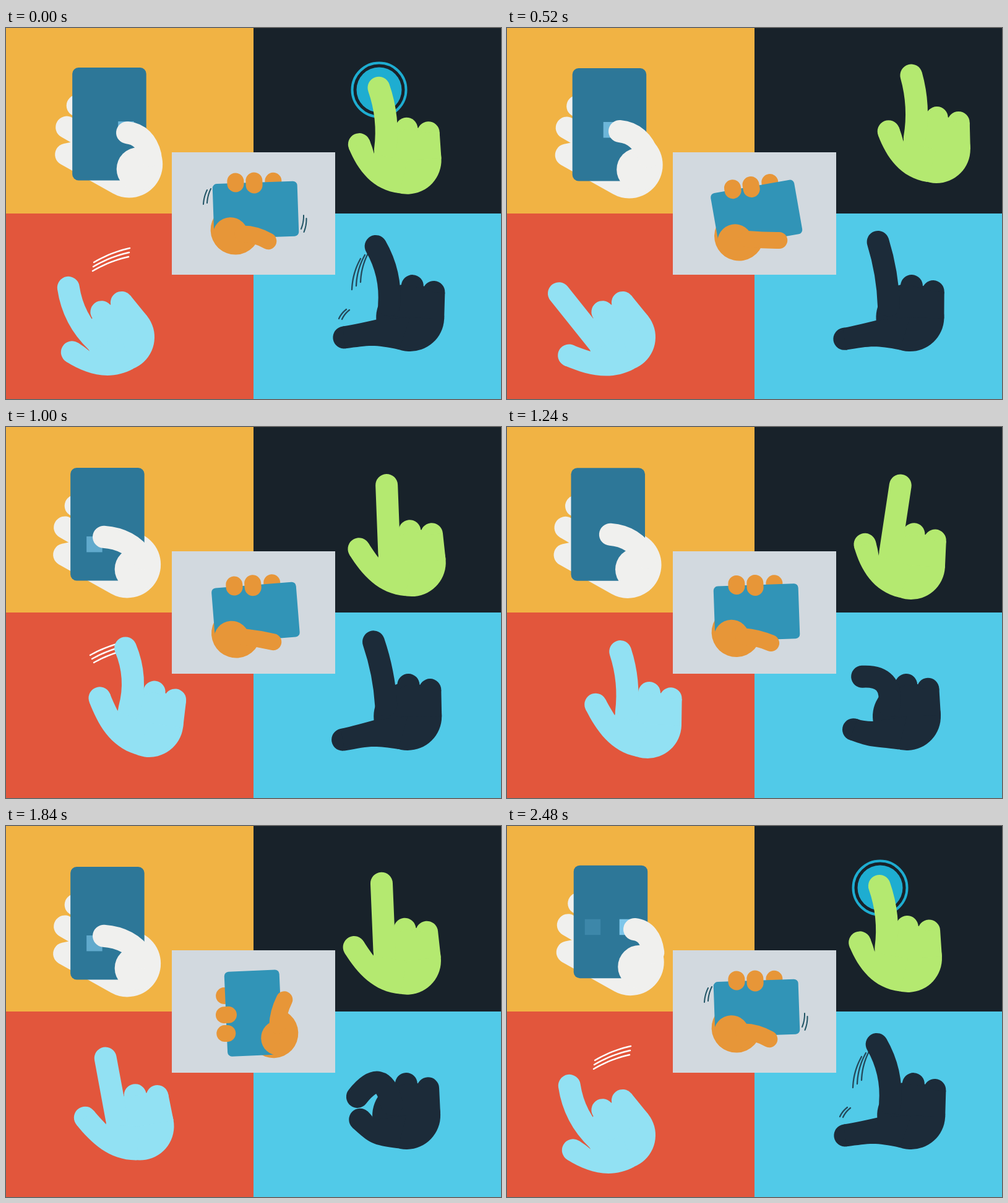
Animation of 800x600 px, one loop 2520 ms. Source, as an HTML page with a canvas:

```html
<!DOCTYPE html>
<html lang="en">
<head>
<meta charset="utf-8">
<title>Hand gestures</title>
<style>
  html, body { margin: 0; width: 100%; height: 100%; overflow: hidden; }
  canvas { display: block; width: 800px; height: 600px; }
</style>
</head>
<body>
<canvas id="stage" width="800" height="600"></canvas>
<script>
const ctx = document.getElementById('stage').getContext('2d');
const LOOP = 2520, STEP = 40, TYPING_LOOP = 840;
const SNAP = 2290, SNAPPED = 2440;
const RAD = Math.PI / 180, TURN = 2 * Math.PI;

const clamp = v => Math.max(0, Math.min(1, v));
const mod = (v, m) => ((v % m) + m) % m;
const mix = (a, b, u) => a + (b - a) * u;
const mixPoint = (a, b, u) => a.map((v, i) => mix(v, b[i], u));

function ease(t, from, to) {
  const u = clamp((t - from) / (to - from));
  return u * u * (3 - 2 * u);
}

// Eased moves one after another, each [from, to, value]
const glide = (t, value, ...moves) =>
  moves.reduce((v, [from, to, goal]) => mix(v, goal, ease(t, from, to)), value);

function paint(color) {
  ctx.fillStyle = ctx.strokeStyle = color;
}

function panel(color, x, y, w, h) {
  paint(color);
  ctx.fillRect(x, y, w, h);
}

function disc(x, y, r) {
  ctx.beginPath();
  ctx.arc(x, y, r, 0, TURN);
  ctx.fill();
}

// Hull of two circles
function capsule(x1, y1, r1, x2, y2, r2) {
  const a = Math.atan2(y2 - y1, x2 - x1);
  const b = Math.acos((r1 - r2) / Math.hypot(x2 - x1, y2 - y1));
  ctx.beginPath();
  ctx.arc(x1, y1, r1, a + b, a - b + TURN);
  ctx.arc(x2, y2, r2, a - b, a + b);
  ctx.fill();
}

function roundRect(x, y, w, h, r) {
  ctx.beginPath();
  ctx.roundRect(x, y, w, h, r);
  ctx.fill();
}

function limb(tip, control, base, width) {
  ctx.lineWidth = width;
  ctx.lineCap = 'round';
  ctx.beginPath();
  ctx.moveTo(...tip);
  ctx.quadraticCurveTo(...control, ...base);
  ctx.stroke();
}

// Point beside the middle of a line, off by a distance
function bowed([x1, y1], [x2, y2], distance) {
  const dx = x2 - x1, dy = y2 - y1, k = distance / Math.hypot(dx, dy);
  return [(x1 + x2) / 2 + dy * k, (y1 + y2) / 2 - dx * k];
}

// Parallel speed lines that shoot out, then run off from the tail
function streaks(t, start, width, count, from, to, shift, bow) {
  const age = mod(t - start, LOOP);
  const head = clamp(age / 80), tail = clamp((age - 120) / 120);
  if (head <= tail) return;
  const length = Math.hypot(to[0] - from[0], to[1] - from[1]);
  const control = bowed(from, to, bow * length);
  const pointAt = u => mixPoint(mixPoint(from, control, u), mixPoint(control, to, u), u);
  ctx.lineWidth = width;
  ctx.lineCap = 'round';
  for (let n = 0; n < count; n++) {
    ctx.beginPath();
    for (let i = 0; i <= 12; i++) {
      const [x, y] = pointAt(mix(tail, head, i / 12));
      ctx.lineTo(x + n * shift[0], y + n * shift[1]);
    }
    ctx.stroke();
  }
}

// Fist with index finger and thumb, measured from the middle of the palm
function drawHand(color, { x, y, turn, tip, bend, base = [-35, -18], thumb, angle, creaseY = -12 }) {
  const ax = Math.cos(angle * RAD), ay = Math.sin(angle * RAD);
  const outX = thumb[0] - 18 * ay, outY = thumb[1] + 18 * ax;
  const inX = thumb[0] + 18 * ay, inY = thumb[1] - 18 * ax;
  ctx.save();
  ctx.translate(x, y);
  ctx.rotate(turn * RAD);
  paint(color);
  disc(0, 0, 55);
  disc(1, -51, 18);
  disc(36, -43, 18);
  ctx.beginPath();
  for (const corner of [[-28, -40], [1, -51], [36, -43], [54, -43], [55, 0], [-28, 0]]) {
    ctx.lineTo(...corner);
  }
  ctx.fill();
  limb(tip, bowed(tip, base, bend), base, 36);
  disc(...thumb, 18);
  ctx.beginPath();
  ctx.moveTo(outX, outY);
  ctx.bezierCurveTo(outX + 38 * ax, outY + 38 * ay, -58, 46, -15, 53);
  ctx.lineTo(0, 0);
  ctx.lineTo(-53, creaseY);
  ctx.quadraticCurveTo(inX + 12 * ax, inY + 12 * ay, inX, inY);
  ctx.fill();
  ctx.restore();
}

// A tucked thumb points further down
const thumbPose = tuck => ({ thumb: [-85 + 12 * tuck, -29], angle: 61 + 13 * tuck });

const keys = [
  { at: 60, x: 26, y: 111 },
  { at: 450, x: 50, y: 87 },
  { at: 610, x: 18, y: 87 },
  { at: 770, x: 74, y: 87 }
];

function lastOf(events, t, period) {
  const age = e => mod(t - e.at, period);
  const last = events.reduce((a, b) => age(b) < age(a) ? b : a);
  const next = events[(events.indexOf(last) + 1) % events.length];
  return { last, next, age: age(last), gap: mod(next.at - last.at, period) };
}

function drawTyping(time) {
  const t = time % TYPING_LOOP;
  const { last, next, age, gap } = lastOf(keys, t, TYPING_LOOP);
  const move = ease(age, gap - 85, gap);
  const tipX = 132 + mix(last.x, next.x, move);
  const tipY = 167 + 0.45 * (mix(last.y, next.y, move) - 87);
  const bob = Math.cos(TURN * (t + 120) / TYPING_LOOP);

  ctx.save();
  ctx.translate(-2.5 + 2.7 * bob, 1.6 - 1.7 * bob);
  paint('#f0f0ee');
  disc(116, 125, 17.5);
  capsule(99, 160, 18, 130, 178, 18);
  capsule(98, 204, 18, 200, 220, 54);
  paint('#2d7798');
  roundRect(108, 63.5, 119.5, 182.5, 10);
  paint('#7dc6ea');
  for (const key of keys) {
    ctx.globalAlpha = clamp(1 - (mod(t - key.at, TYPING_LOOP) - 30) / 200);
    ctx.fillRect(108 + key.x, 63.5 + key.y, 25.5, 25.5);
  }
  ctx.globalAlpha = 1;
  paint('#f0f0ee');
  disc(214.5, 227.5, 35);
  ctx.restore();

  paint('#f0f0ee');
  const reach = tipX - 155;
  limb([tipX, tipY], [198 + 0.66 * reach, tipY + 3], [221 + 0.3 * reach, 213 - 0.17 * reach], 36);
}

const taps = [
  { at: 600, spot: [647, 78], palm: [692, 196] },
  { at: 1440, spot: [595, 104], palm: [648, 224] },
  { at: 2440, spot: [603, 100], palm: [648, 214] }
];

function drawRipple(age, [x, y]) {
  if (age >= 280) return;
  const grow = clamp((age - 80) / 200);
  ctx.globalAlpha = 1 - grow;
  paint('#1eadd1');
  disc(x, y, 36.5 + 4 * grow);
  ctx.lineWidth = 4;
  ctx.beginPath();
  ctx.arc(x, y, 43.5 + 6 * grow, 0, TURN);
  ctx.stroke();
  ctx.globalAlpha = 1;
}

function drawTapping(t) {
  const { last, next, age, gap } = lastOf(taps, t, LOOP);
  const p = age / gap;
  const press = glide(p, 1, [0.12, 0.36, 0], [0.78, 0.9, 1]);
  const windup = glide(p, 0, [0.45, 0.78, 1], [0.8, 0.94, 0]);
  const [x, y] = mixPoint(last.palm, next.palm, ease(p, 0.08, 0.62));
  drawRipple(age, last.spot);
  drawHand('#b4e970', {
    x: x + 5 * windup, y,
    turn: glide(p, -2.5, [0.12, 0.38, -5], [0.45, 0.78, 4], [0.8, 0.94, -2.5]),
    tip: mixPoint([-30 + 4 * windup, -128], [-41, -119], press),
    bend: 12 * press,
    ...thumbPose(Math.max(0.15, 0.7 * press, 0.7 * windup))
  });
}

function drawSwiping(t) {
  const swing = glide(t, 0, [560, 820, -0.08], [880, 1000, 0.885],
    [1080, 1500, 0.54], [1900, 2240, 1], [SNAP, SNAPPED, 0]);
  const flick = glide(t, -1, [100, 500, 0], [880, 1000, 1], [1080, 1480, 0], [SNAP, SNAPPED, -1]);
  const tuck = glide(t, 0.7, [100, 480, 0], [1900, 2240, 1], [SNAP, SNAPPED, 0.7]);
  const bow = Math.sin(Math.PI * swing);
  paint('#fff');
  streaks(t, 2400, 2.5, 3, [200, 356], [142, 379], [-1, 7], -0.08);
  streaks(t, 920, 2.5, 3, [136, 369], [182, 350], [3, 6], 0.06);
  drawHand('#92e1f3', {
    x: mix(185, 236, swing) + 4 * bow,
    y: mix(500, 477, swing) - 2 * bow,
    turn: mix(-38, 14, swing),
    tip: [-36 - 19 * flick, -118 + 3 * Math.abs(flick)],
    bend: 17 * flick,
    ...thumbPose(tuck)
  });
}

function drawPinching(t) {
  const closed = glide(t, 0, [1160, 1300, 1], [SNAP, SNAPPED, 0]);
  const flick = glide(t, 1, [80, 520, 0], [SNAP, SNAPPED, 1]);
  const turn = glide(t, 3, [0, 1160, 0], [1160, 1300, -3.5], [1300, 2240, 0], [SNAP, SNAPPED, 3]);
  paint('#24495b');
  streaks(t, 2400, 2.3, 3, [559, 423], [573, 373], [7, -6], 0.12);
  streaks(t, 2400, 2.3, 2, [538, 470], [550, 455], [5, 1], 0.12);
  drawHand('#1c2b39', {
    x: 649 + 1.4 * turn, y: 468, turn,
    tip: mixPoint([-55.5 - 6 * flick, -120.5 + 8.5 * flick], [-78.5, -32], closed),
    bend: mix(7 + 8 * flick, 60, closed),
    base: [mix(-35, -23, closed), -18],
    thumb: mixPoint([-105, 38], [-75, 5], closed),
    angle: mix(-10, 43, closed),
    creaseY: 6
  });
}

function drawTurning(t) {
  const turn = glide(t, 88, [60, 540, 80], [600, 1240, 88], [1300, 1440, -4.6],
    [1480, 2240, 0], [SNAP, SNAPPED, 88]);
  const jolt = glide(t, 1, [60, 500, 0], [SNAP, SNAPPED, 1]);
  const relax = glide(t, 0, [60, 520, 1], [600, 1400, 0.2], [1440, 2240, 0]);
  const skin = '#e79638';

  panel('#d2d9df', 268, 201, 264, 198);
  paint('#1f5364');
  streaks(t, 2400, 2, 2, [319, 285], [325, 262], [6, -2], 0.1);
  streaks(t, 2400, 2, 2, [477, 325], [481, 303], [4.5, 5], -0.1);
  streaks(t, 1400, 2, 2, [366, 233], [399, 221], [6, -7], 0.07);
  streaks(t, 1400, 2, 2, [387, 374], [419, 377], [5, 6], -0.08);

  ctx.save();
  ctx.translate(400 + 0.04 * turn, 302.5 - 0.03 * turn - 5.5 * jolt);
  ctx.rotate(turn * RAD);
  paint(skin);
  disc(31, 34, 40);
  disc(-46, -30, 13.5);
  paint('#3194b7');
  roundRect(-44.5, -68.5, 89, 137, 7);
  paint(skin);
  capsule(-47.5, 1, 13.5, -40.5, 1, 13.5);
  capsule(-47.5, 31, 13.5, -43.5, 31, 13.5);
  disc(39, 42, 28.5);
  limb([51 - 2 * relax, -18.5 - 10 * relax], [38.5 + 6.5 * relax, 2.5 - 7 * relax], [38, 22], 27);
  ctx.restore();
}

function draw(t) {
  panel('#f1b344', 0, 0, 400, 300);
  panel('#18222a', 400, 0, 400, 300);
  panel('#e2563c', 0, 300, 400, 300);
  panel('#51cae8', 400, 300, 400, 300);
  drawTyping(t);
  drawTapping(t);
  drawSwiping(t);
  drawPinching(t);
  drawTurning(t);
}

const began = performance.now();
function tick() {
  const elapsed = (performance.now() - began) % LOOP;
  draw(Math.floor(elapsed / STEP) * STEP);
  requestAnimationFrame(tick);
}
tick();
</script>
</body>
</html>
```
